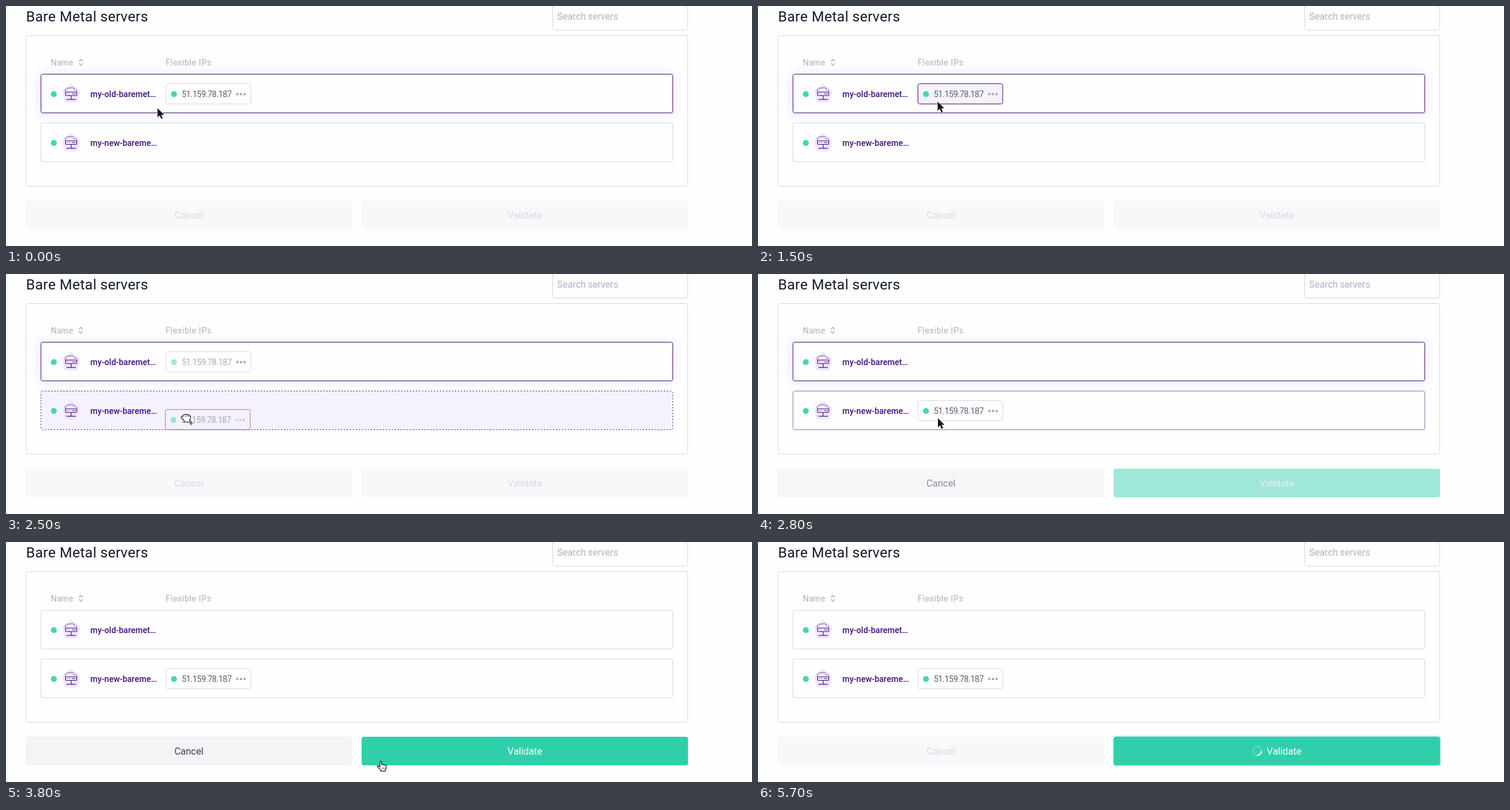
Animation, 1248 px wide and 403 px high, one loop 5.8 s. Source, as an HTML page:

```html
<!DOCTYPE html>
<html lang="en">
<head>
<meta charset="utf-8">
<title>Bare Metal servers</title>
<style>
html, body { margin: 0; width: 100%; height: 100%; overflow: hidden; background: #fefefe; }
svg { display: block; }
text { font-family: Roboto, "Open Sans", sans-serif; font-size: 14px; font-kerning: none; white-space: pre; }
.title { font-size: 24px; letter-spacing: .28px; fill: #151a2d; }
.search { font-size: 16px; letter-spacing: -.24px; fill: #b4b2c2; }
.head { fill: #b0aebe; }
.name { font-weight: 500; fill: #43107c; }
.ip { letter-spacing: -.5px; fill: #5f5c72; }
.btn { font-size: 16px; }
.line { fill: none; stroke: #d6d5e3; }
.dot { fill: #45d6b5; }
.more { fill: #a5a4b0; }
.glow { fill: #f1eeff; filter: blur(8px); }
.ink { fill: none; stroke: #4f0f88; stroke-width: 1.2; stroke-linecap: round; stroke-linejoin: round; }
.cloud { stroke: #7a43b4; stroke-width: 1; }
.hand { fill: #fff; stroke: #111; stroke-width: 1.2; stroke-linejoin: round; }
</style>
</head>
<body>
<svg width="1248" height="403" viewBox="0 0 1248 403">
  <defs>
    <g id="server">
      <circle class="dot" cx="80" cy="0" r="5"/>
      <path d="M109 -15 L122.500 -4.500 L118 12 H100 L95.500 -4.500 Z" fill="#eee8fb" stroke="#eee8fb" stroke-width="4" stroke-linejoin="round"/>
      <path class="ink cloud" d="M100 -2.500 a3.500 3.500 0 0 1 1 -6 a4.500 4.500 0 0 1 6 -1.500 a5 5 0 0 1 7.500 2 a3.700 3.700 0 0 1 3.500 5.500"/>
      <rect class="ink" x="99.500" y="-3.500" width="19" height="6" rx="1.500"/>
      <path class="ink" d="M103 -.5h.1 M106 -.5h.1 M111 -.5h5 M109 3v5.500 M101.500 8.800h15"/>
    </g>
    <g id="chip">
      <circle class="dot" cx="14" cy="18" r="5"/>
      <text class="ip" x="27" y="23">51.159.78.187</text>
    </g>
    <g id="more" class="more">
      <circle cx="120" cy="18" r="2"/><circle cx="126" cy="18" r="2"/><circle cx="132" cy="18" r="2"/>
    </g>
  </defs>

  <text class="title" x="33.500" y="26">Bare Metal servers</text>
  <rect class="line" x="914.500" y="-9.500" width="226" height="50" rx="4"/>
  <text class="search" x="922" y="23">Search servers</text>
  <rect class="line" x="33.500" y="49.500" width="1107" height="253" rx="4"/>
  <text class="head" x="75" y="100">Name</text>
  <path d="M122 92.500 l3 -3 l3 3 M122 96.500 l3 3 l3 -3" fill="none" stroke="#a09eae" stroke-width="1.200"/>
  <text class="head" x="267" y="100" letter-spacing=".5">Flexible IPs</text>

  <rect class="glow" id="glow" x="54" y="110" width="1066" height="74" rx="8"/>
  <rect id="row1" x="58.500" y="114.500" width="1057" height="65" rx="3" fill="#fefefe"/>
  <rect id="row2" x="58.500" y="196.500" width="1057" height="65" rx="3" stroke-dashoffset=".5"/>
  <use href="#server" y="148"/>
  <use href="#server" y="230"/>
  <text class="name" x="141" y="153">my-old-baremet…</text>
  <text class="name" x="141" y="235">my-new-bareme…</text>

  <g id="home">
    <rect id="homeBox" x=".5" y=".5" width="142" height="34" rx="3"/>
    <use id="homeBody" href="#chip"/>
    <use href="#more"/>
  </g>
  <g id="drag" opacity=".5">
    <rect x=".5" y=".5" width="142" height="34" rx="3" fill="#f4f1fe" stroke="#4d0c72"/>
    <use href="#chip"/>
    <use href="#more"/>
  </g>

  <rect id="cancel" x="33" y="327" width="546" height="48" rx="4"/>
  <text class="btn" id="cancelText" x="306" y="357" text-anchor="middle">Cancel</text>
  <rect id="ring" x="593" y="325" width="550" height="52" rx="6" fill="#c3f1e6"/>
  <rect id="ok" x="595" y="327" width="546" height="48" rx="4"/>
  <text class="btn" id="okText" y="357" text-anchor="middle">Validate</text>
  <g id="spinner" fill="none" stroke="#fff" stroke-width="2">
    <circle r="7.200" opacity=".25"/>
    <path d="M5.090 -5.090 A7.200 7.200 0 0 1 5.090 5.090"/>
  </g>

  <path id="arrow" d="M0 0 V15.500 L3.600 12.200 L6.100 18 L8.700 16.900 L6.200 11.300 H11 Z" fill="#15151c" stroke="#fff" paint-order="stroke"/>
  <g id="grab">
    <path class="hand" d="M3.500 9 L1 8 Q-.5 5 2.500 4.500 L3.500 5 Q2.500 2 5 2 Q6 .3 8 1.500 Q10 .3 11.200 2 Q13.500 1.300 14 3.300 Q16.500 3.200 16.300 6 Q16.300 9 14.500 11.500 V14 H5.500 V12 Z"/>
    <path d="M7 3v2 M10 3v2 M13 4v1.500" stroke="#111"/>
    <path d="M17 11v9 M12.500 15.500h9" stroke="#fff" stroke-width="3"/>
    <path d="M17 11.500v8 M13 15.500h8" stroke="#111" stroke-width="1.200"/>
  </g>
  <g id="point">
    <path class="hand" d="M5.200 9.500 V2 a1.400 1.400 0 0 1 2.800 0 V6.300 q1.400 -.8 2.600 .3 q1.400 -.7 2.500 .5 q2.300 -.5 2.500 1.300 v3 q0 2 -1.500 3.800 v2 H6.500 v-1.600 L1 9.800 q-.6 -1.900 1.200 -1.700 q1.500 .2 3 2.200 Z"/>
    <path d="M8.500 11v3 M10.700 11v3 M12.900 11v3" stroke="#333" stroke-width=".8"/>
  </g>
</svg>
<script>
const LOOP = 5800, STEP = 100;
const GRAB = 1600, DROP = 2800, OVER_OK = 3600, PRESS = 4000, LOAD = 4200;
const GREY = "#d6d5e3", PURPLE = "#4d0c72", PAGE = "#fefefe", LILAC = "#f5f2fe";

const $ = id => document.getElementById(id);
const set = (id, attrs) => { for (const k in attrs) $(id).setAttribute(k, attrs[k]); };
const show = (id, on) => { $(id).style.display = on ? "" : "none"; };
const move = (id, x, y) => set(id, { transform: `translate(${x} ${y})` });
const ramp = (t, from, to) => Math.min(1, Math.max(0, (t - from) / (to - from)));

function mix(a, b, p) {
  const part = (c, i) => parseInt(c.substr(i, 2), 16);
  return `rgb(${[1, 3, 5].map(i => Math.round(part(a, i) + (part(b, i) - part(a, i)) * p))})`;
}

// Each leg glides to a point between two times.
const legs = [
  { from: 300, to: 500, x: 279, y: 173.5 },
  { from: 600, to: 1000, x: 300.5, y: 160.5 },
  { from: GRAB, to: DROP, x: 301, y: 242 },
  { from: 3200, to: 3300, x: 323.5, y: 272 },
  { from: 3300, to: 3700, x: 620.5, y: 367.5 },
  { from: 4400, to: 4700, x: 1370, y: 372 }
];

function pointer(t) {
  let x = 253.5, y = 171.5;
  for (const leg of legs) {
    const p = ramp(t, leg.from, leg.to);
    x += (leg.x - x) * p;
    y += (leg.y - y) * p;
  }
  return [x, y];
}

function drawRows(t) {
  const over = t >= 1800 && t < DROP;
  const aim = ramp(t, 1700, 2000);
  const fade = 1 - ramp(t, 3200, 3450);
  const fresh = ramp(t, 2700, 2900) * fade;
  set("glow", { opacity: fade });
  set("row1", { stroke: mix(GREY, PURPLE, fade) });
  set("row2", {
    stroke: mix(GREY, PURPLE, over ? aim : fresh),
    fill: mix(PAGE, LILAC, over ? aim : 0),
    "stroke-dasharray": over ? "2 3" : "none"
  });
}

function drawChips(t) {
  const dragging = t >= GRAB && t < DROP;
  const hot = t < GRAB ? ramp(t, 600, 1000) : 0;
  move("home", 267, t < DROP ? 130 : 212);
  set("homeBox", { stroke: mix(GREY, PURPLE, hot), fill: mix(PAGE, LILAC, hot) });
  set("homeBody", { opacity: dragging ? .5 : 1 });

  const fall = Math.sin(ramp(t, GRAB, 2200) * Math.PI / 2);
  const settle = ramp(t, 2400, 2500);
  const x = 267 - 2 * fall + settle, y = 130 + 85 * fall + 12 * settle;
  move("drag", x, y);
  move("grab", x + 26.5, y + 7.5);
  show("drag", dragging);
  show("grab", dragging);
}

function drawButtons(t) {
  const on = ramp(t, 2700, 2900);
  const open = on - ramp(t, 4100, 4400);
  const lit = ramp(t, 3500, 3800);
  const loading = t >= LOAD;
  set("cancel", { fill: mix("#f8f8fa", "#f4f3f6", open) });
  set("cancelText", { fill: mix("#d9d8e5", "#3f3d56", open) });
  set("ok", { fill: lit ? mix("#46d6b6", "#30cfac", lit) : mix("#f8f8fa", "#46d6b6", on) });
  set("okText", { x: loading ? 880 : 868, fill: mix("#d9d8e5", "#ffffff", on) });
  show("ring", t >= PRESS);
  // The quarter arc turns once every 750 ms.
  show("spinner", loading);
  set("spinner", { transform: `translate(835 351) rotate(${(t - 4400) * 360 / 750 + 141})` });
}

function drawPointer(t) {
  const [x, y] = pointer(t);
  move("arrow", x, y);
  move("point", x, y);
  show("arrow", t < GRAB || (t >= DROP && t < OVER_OK));
  show("point", t >= OVER_OK);
}

const start = performance.now();
function tick() {
  const now = Math.max(0, performance.now() - start) % LOOP;
  const t = Math.floor(now / STEP) * STEP;
  for (const draw of [drawRows, drawChips, drawButtons, drawPointer]) draw(t);
  requestAnimationFrame(tick);
}
tick();
</script>
</body>
</html>
```
